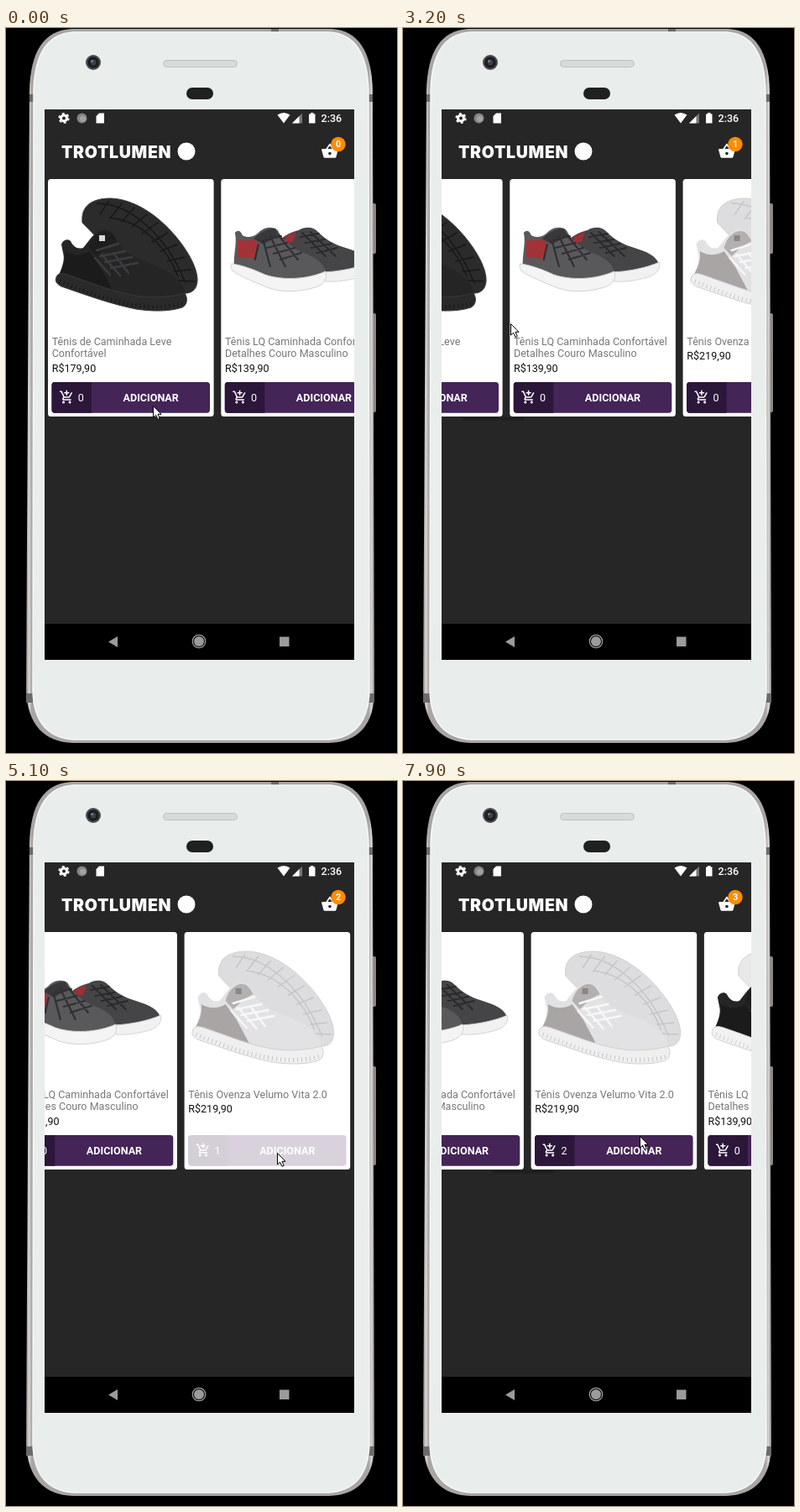
An HTML page for the animation above (8 s loop, 466x864 px).

```html
<!DOCTYPE html>
<html lang="pt-BR">
<head>
<meta charset="utf-8">
<title>Loja de tênis</title>
<style>
html, body { margin: 0; width: 100%; height: 100%; overflow: hidden; background: #000; }
svg { display: block; width: 466px; height: 864px; font: 12.56px Roboto, "Open Sans", sans-serif; }
.brand { font: 900 19.5px Inter, Roboto, sans-serif; letter-spacing: .7px; }
.bold { font-weight: 700; }
.mid { text-anchor: middle; }
.line { fill: none; stroke-linecap: round; stroke-linejoin: round; }
</style>
</head>
<body>
<svg viewBox="0 0 466 864">
  <defs>
    <clipPath id="screen"><rect x="46" y="97" width="369" height="656"/></clipPath>
    <linearGradient id="rim">
      <stop offset="0" stop-color="#8d8987"/><stop offset=".008" stop-color="#d9d6d4"/>
      <stop offset=".016" stop-color="#a9a5a3"/><stop offset=".984" stop-color="#a9a5a3"/>
      <stop offset=".992" stop-color="#d9d6d4"/><stop offset="1" stop-color="#8d8987"/>
    </linearGradient>
    <path id="cart" d="M11 9h2V6h3V4h-3V1h-2v3H8v2h3v3zm-4 9c-1.1 0-1.99.9-1.99 2S5.9 22 7 22s2-.9 2-2-.9-2-2-2zm10 0c-1.1 0-1.99.9-1.99 2s.89 2 1.99 2 2-.9 2-2-.9-2-2-2zm-9.83-3.25l.03-.12.9-1.63h7.45c.75 0 1.41-.41 1.75-1.03l3.86-7.01L19.42 4h-.01l-1.1 2-2.76 5H8.53l-.13-.27L6.16 6l-.95-2-.94-2H1v2h2l3.6 7.59-1.35 2.45c-.16.28-.25.61-.25.96 0 1.1.9 2 2 2h12v-2H7.42c-.13 0-.25-.11-.25-.25z"/>
  </defs>

  <!-- phone -->
  <g fill="#8b8785">
    <rect x="435" y="209" width="6" height="60" rx="2"/>
    <rect x="435" y="340" width="6" height="118" rx="2"/>
  </g>
  <path fill="url(#rim)" d="M78 1H388C420 3 436 28 437 75L439 790C439 830 420 851 385 852H80C45 851 26 830 24 790L28 75C29 28 45 3 78 1Z"/>
  <g fill="#6d6a69">
    <rect x="28" y="79" width="6" height="9"/><rect x="431" y="79" width="6" height="9"/>
    <rect x="24" y="793" width="8" height="11"/><rect x="431" y="793" width="8" height="11"/>
    <rect x="316" y="1" width="9" height="4"/>
  </g>
  <path fill="#e9edec" stroke="#f6f7f7" stroke-width="1.5" d="M80 5H386C415 7 431 30 432 75L433 790C432 826 416 846 384 848H81C49 846 33 826 32 790L33 75C34 30 50 7 80 5Z"/>
  <circle cx="104" cy="41" r="9" fill="#4b4b4e"/>
  <circle cx="104" cy="41" r="6.8" fill="#1c1c20"/>
  <circle cx="104" cy="41" r="3.4" fill="#3c3f4c"/>
  <circle cx="102.5" cy="39.5" r="1.2" fill="#8a8d98"/>
  <rect x="187.5" y="38.5" width="88" height="8" rx="4" fill="#d9dbda" stroke="#bfc1c1"/>
  <rect x="215" y="71" width="32" height="14" rx="7" fill="#1e2021"/>

  <g clip-path="url(#screen)">
    <rect x="46" y="97" width="369" height="656" fill="#262626"/>

    <!-- status bar -->
    <g fill="#fff">
      <circle cx="69" cy="107.5" r="3.5" class="line" stroke="#fff" stroke-width="3"/>
      <circle cx="69" cy="107.5" r="5.6" class="line" stroke="#fff" stroke-width="2" stroke-dasharray="2.9 2.96" style="stroke-linecap:butt"/>
      <circle cx="90.5" cy="107.5" r="6" fill="#858585"/>
      <circle cx="91.5" cy="108" r="3.6" fill="#a2a2a2"/>
      <path d="M111 101.500H117V113.500H107.500V105Z"/>
      <path d="M323.500 103.500Q331 98.500 338.500 103.500L331 113.500Z"/>
      <path d="M341 113.500L353 101.500V113.500Z" fill="#777"/>
      <path d="M341 113.500L349.500 105V113.500Z"/>
      <path d="M361 102.500H363V101H366.500V102.500H368.500V113.500H361Z"/>
      <text x="375.500" y="112" font-weight="500">2:36</text>
    </g>

    <!-- header -->
    <text class="brand" x="66" y="155" fill="#fff">TROTLUMEN</text>
    <circle cx="215" cy="147" r="10.500" fill="#fff"/>
    <path fill="#fff" transform="translate(375.200 136) scale(.897)" d="M17.210 9l-4.380-6.560c-.190-.280-.510-.420-.830-.420-.320 0-.640.140-.830.430L6.790 9H2c-.550 0-1 .450-1 1 0 .090.010.180.040.270l2.540 9.270c.230.840 1 1.460 1.920 1.460h13c.920 0 1.690-.620 1.930-1.460l2.540-9.270L23 10c0-.550-.450-1-1-1h-4.790zM9 9l3-4.400L15 9H9zm3 8c-1.100 0-2-.900-2-2s.900-2 2-2 2 .900 2 2-.900 2-2 2z"/>
    <circle cx="396" cy="138.500" r="8.700" fill="#ff8c00"/>
    <text id="badge" class="mid bold" x="396" y="142.300" font-size="10.800" fill="#fff">0</text>

    <g id="track"></g>
    <rect id="bar" x="46" y="464" width="73.500" height="3.500" fill="#1e1e1e"/>

    <!-- navigation bar -->
    <rect x="46" y="710" width="369" height="43" fill="#000"/>
    <g fill="#9b9b9b">
      <path d="M122 731.500L133 725V738Z"/>
      <circle cx="230" cy="731" r="6"/>
      <circle cx="230" cy="731" r="7.700" class="line" stroke="#9b9b9b" stroke-width="1.300"/>
      <rect x="326" y="725.500" width="11.500" height="11.500"/>
    </g>
  </g>

  <path id="cursor" fill="#fff" stroke="#000" stroke-width="1" stroke-linejoin="round" d="M.5 .5V14L3.600 11.200L6 16.400L8.200 15.400L6 10.300H10Z"/>
</svg>

<script>
const $ = id => document.getElementById(id);
const LOOP = 8000, STEP = 100, PITCH = 206.3;

// Pair with one sole turned to the viewer
const turned = c => `<g transform="translate(-50 0)">
  <path fill="${c.back}" stroke="${c.edge}" d="M91 232C89 212 102 203 125 203C152 204 180 222 202 248C218 267 229 288 228 302C227 313 220 317 210 316L120 262Z"/>
  <path class="line" stroke="${c.tread}" stroke-width="1.500" d="M108 209C146 209 190 244 214 304M124 226C160 230 190 258 205 296
    M112 222L122 207M124 227L138 209M138 231L153 214M150 237L168 222M162 245L181 232M174 255L193 244M184 266L204 258M192 278L213 273M200 290L220 288M206 301L225 302"/>
  <path fill="${c.upper}" d="M66 258C68 252 74 251 77 254C80 260 84 264 92 262C98 255 103 246 112 241C120 238 127 242 131 250C137 262 146 270 158 275C176 282 196 289 207 302C212 308 214 314 213 320L150 328L62 298C65 288 71 278 68 268Z"/>
  <path fill="${c.panel}" d="M70 266C80 272 92 271 99 266L112 284L128 314L104 308L63 294C67 287 72 277 70 266Z"/>
  <path fill="${c.tongue}" d="M99 262C102 250 110 243 117 242C125 241 129 248 132 254L121 260L108 272Z"/>
  <rect x="111" y="247" width="7" height="7" fill="${c.tag}"/>
  <path class="line" stroke="${c.lace}" stroke-width="2.500" d="M108 265L134 257M112 272L142 266M118 279L150 273M125 286L157 280M106 274L124 294M114 270L136 295M128 268L146 292"/>
  <path fill="${c.sole}" stroke="${c.edge}" d="M60 297C62 291 68 292 76 295C100 303 130 316 160 320C180 322 200 320 213 316C217 322 216 330 210 333C195 338 175 338 155 335C125 329 95 318 66 308C60 305 58 301 60 297Z"/>
  <path class="line" stroke="${c.tread}" stroke-width="5" stroke-dasharray="1 4" style="stroke-linecap:butt" d="M64 302C95 315 125 326 158 331C180 334 200 332 212 328"/>
</g>`;

// Pair standing side by side
const sided = () => `<g transform="translate(-127.500 0)">
  <path fill="#454548" d="M198 252C205 246 212 243 220 241C228 236 238 237 243 243C252 252 262 258 276 262C292 267 302 272 305 281L300 290L250 293Z"/>
  <path fill="#9c3035" d="M204 248L217 243L213 255L203 257Z"/>
  <path class="line" stroke="#29292b" stroke-width="2" d="M222 249L244 245M228 256L251 252M235 262L259 257M242 268L266 262M224 244L252 272M234 243L264 272"/>
  <path fill="#f1f1f1" stroke="#d5d5d5" d="M250 291C270 290 290 286 306 279C307 288 302 294 292 297C278 301 264 303 252 302Z"/>
  <path fill="#59595c" d="M144 244C148 240 151 242 153 247C160 251 168 249 174 242C180 237 190 236 195 241C201 253 212 262 226 268C240 273 250 280 252 291L205 304L143 284C142 270 147 256 144 244Z"/>
  <path fill="#a23238" d="M147 252C153 254 160 254 166 251L173 258L168 275L147 273C146 266 148 259 147 252Z"/>
  <path fill="#38383a" d="M166 251C174 244 182 238 192 239L196 247L178 258Z"/>
  <path class="line" stroke="#303033" stroke-width="2.200" d="M176 254L199 248M182 262L206 256M190 269L215 262M198 276L223 268M172 258L168 276M178 254L186 284M186 248L204 284M196 247L219 276"/>
  <path fill="#f4f4f4" stroke="#d2d2d2" d="M140 281C150 282 165 287 180 294C200 301 230 300 252 290C255 299 250 306 240 309C220 315 200 315 185 310C168 303 150 296 142 290C139 287 139 284 140 281Z"/>
</g>`;

const black = { back: "#2b2b2c", edge: "#3a3a3b", tread: "#171718", upper: "#252526", panel: "#1b1b1c", tongue: "#1d1d1e", tag: "#d8d8d8", lace: "#3c3c3e", sole: "#2a2a2b" };
const white = { back: "#dddddf", edge: "#d0d0d2", tread: "#c6c6c9", upper: "#e2e2e4", panel: "#aaa5a5", tongue: "#b4b0b0", tag: "#8b8686", lace: "#f7f7f7", sole: "#efeff0" };
const mixed = { ...black, back: "#e8e8e9", edge: "#d3d3d4", tread: "#cfcfd0", sole: "#f2f2f2" };

const walk = ["Tênis LQ Caminhada Confortável", "Detalhes Couro Masculino"];
const items = [
  { title: ["Tênis de Caminhada Leve", "Confortável"], price: "179,90", art: turned(black) },
  { title: walk, price: "139,90", art: sided() },
  { title: ["Tênis Ovenza Velumo Vita 2.0"], price: "219,90", art: turned(white) },
  { title: walk, price: "139,90", art: turned(mixed) }
];

const card = ({ title, price, art }, i) => `<g transform="translate(${50 + i * PITCH} 0)">
  <rect y="180" width="197.600" height="283" rx="3.500" fill="#fff"/>
  ${art}
  ${title.map((s, n) => `<text x="4.700" y="${377.7 + n * 14.7}" fill="#777">${s}</text>`).join("")}
  <text x="4.700" y="${395 + (title.length - 1) * 14.7}" fill="#111">R$${price}</text>
  <g id="button${i}" fill="#fff">
    <rect x="4.500" y="422" width="188.500" height="36.700" rx="3.600" fill="#452457"/>
    <path d="M8 422H52V458.700H8Q4.500 458.700 4.500 455V425.700Q4.500 422 8 422Z" fill="#2c163a"/>
    <use href="#cart" transform="translate(13.300 431) scale(.75)"/>
    <text id="count${i}" x="35.800" y="445.400">0</text>
    <text class="mid bold" x="122.700" y="445.400">ADICIONAR</text>
  </g>
</g>`;
$("track").innerHTML = items.map(card).join("");

// Linear interpolation over [time, ...values] keys
function mix(keys, t) {
  const n = keys.findIndex(k => k[0] > t);
  if (n < 0) return keys[keys.length - 1].slice(1);
  if (n === 0) return keys[0].slice(1);
  const a = keys[n - 1], b = keys[n], p = (t - a[0]) / (b[0] - a[0]);
  return a.slice(1).map((v, i) => v + (b[i + 1] - v) * p);
}

const path = [
  [0, 175, 450], [100, 175, 450], [200, 175, 449], [300, 175, 449], [400, 175, 448], [1200, 175, 448], [1300, 175, 447],
  [2300, 175, 447], [2500, 195, 428], [2700, 258, 372], [2900, 284, 357], [3000, 258, 355], [3100, 195, 353], [3200, 128, 352],
  [3400, 130, 352], [3600, 180, 356], [3800, 300, 420], [3900, 323, 443], [5700, 323, 443], [5900, 235, 440], [6100, 186, 438],
  [6800, 186, 438], [7100, 215, 398], [7300, 249, 365], [7400, 325, 410], [7500, 338, 423], [7700, 325, 425], [7800, 305, 424], [7900, 282, 423]
];

// Taps: card, pressed, released, time the count goes up, length of the fade down
const taps = [
  [0, 700, 900, 1200, 100], [0, 1700, 2100, 2500, 100],
  [2, 4100, 4200, 4700, 200], [2, 5100, 5600, 6000, 200],
  [1, 6300, 6600, 7000, 100]
];

const easeInOut = p => p < .5 ? 2 * p * p : 1 - 2 * (1 - p) ** 2;
const clamp = v => Math.min(1, Math.max(0, v));

function opacity(i, t) {
  return taps.filter(k => k[0] === i).reduce((o, [, down, up, , len]) => {
    const press = clamp((t - down + len) / len);
    const release = easeInOut(clamp((t - up + STEP) / 250));
    return Math.min(o, 1 - .8 * press * (1 - release));
  }, 1);
}

function scrolled(t, x) {
  if (t < 3000) return 0;
  if (t <= 3200) return Math.max(0, 257 - x);
  if (t < 7500) return t < 3900 ? 250 - 121 * Math.exp(-(t - 3200) / 100) : 250;
  return 250 + 342 - x;
}

function draw(t) {
  const [x, y] = mix(path, t), s = scrolled(t, x);
  const done = taps.filter(k => t >= k[3]);
  $("cursor").setAttribute("transform", `translate(${x} ${y})`);
  $("track").setAttribute("transform", `translate(${-s} 0)`);
  $("bar").setAttribute("transform", `translate(${s * .197} 0)`);
  $("bar").setAttribute("opacity", t >= 3000 && t < 3800 || t >= 7500 ? 1 : 0);
  $("badge").textContent = new Set(done.map(k => k[0])).size;
  items.forEach((_, i) => {
    $("button" + i).setAttribute("opacity", opacity(i, t));
    $("count" + i).textContent = done.filter(k => k[0] === i).length;
  });
}

const start = performance.now();
function tick() {
  const t = (performance.now() - start) % LOOP;
  draw(Math.floor(t / STEP) * STEP);
  requestAnimationFrame(tick);
}
tick();
</script>
</body>
</html>
```
